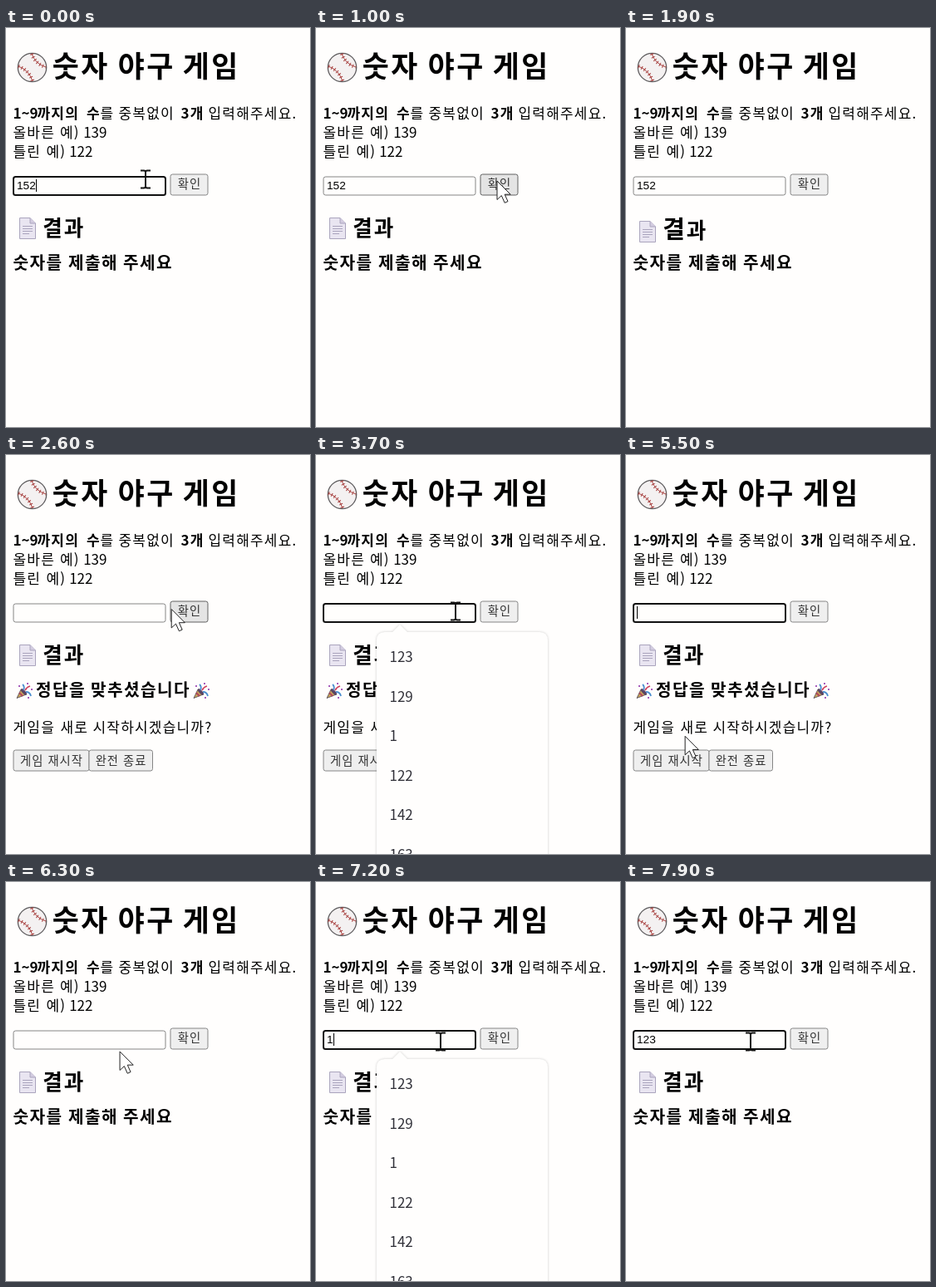
Recreate the animation shown at these times as an HTML page. Size 366 by 480 pixels, loop 8 s.

```html
<!DOCTYPE html>
<html lang="ko">
<head>
<meta charset="utf-8">
<style>
  html, body { margin: 0; width: 100%; height: 100%; overflow: hidden; background: #fffefd; }
  svg { display: block; width: 366px; height: 480px; font: 17px "Noto Sans CJK KR", "Noto Sans CJK", sans-serif; letter-spacing: .07em; }
  text { letter-spacing: .07em; }
  .bold, .h1, .h2, .h3 { font-weight: 700; }
  .h1 { font-size: 34.8px; }
  .h2 { font-size: 25.6px; }
  .h3 { font-size: 20.2px; }
  .num { letter-spacing: 0; }
  .button rect { fill: #efefef; stroke: #858585; }
  .button.hover rect { fill: #e4e4e4; stroke: #606060; }
  .button text { font-size: 14.3px; fill: #333; text-anchor: middle; }
  #field { fill: #fffefd; stroke: #858585; }
  #field.focus { stroke: #111; stroke-width: 2; }
  #value { font: 13.7px "Liberation Sans", Arial, sans-serif; letter-spacing: 0; }
  #list text { fill: #303038; letter-spacing: 0; }
  #panel { fill: #fffefd; filter: drop-shadow(0 0 1.5px #0003); }
</style>
</head>
<body>
<svg viewBox="0 0 366 480">
  <defs>
    <g id="popper">
      <path d="M1 18.5 6 8Q11 9 12.5 14Z" fill="#c9a45c" stroke="#4a4350" stroke-width=".8"/>
      <path d="M4 12 8 16" stroke="#b0475c" stroke-width="2"/>
      <ellipse cx="9.5" cy="11" rx="2" ry="4.8" transform="rotate(-42 9.5 11)" fill="#5b4563"/>
      <path d="M9 9Q11 5 8 2M12 11Q17 11 18 16" fill="none" stroke="#4c8fd0" stroke-width="1.8"/>
      <path d="M11 9Q13 5 17 4" fill="none" stroke="#cf4562" stroke-width="1.8"/>
      <path d="M3 4h2M13 1h2M18 8h2M14 18h2" stroke="#a85dbb" stroke-width="2"/>
    </g>
  </defs>

  <g fill="none" stroke="#a8413f">
    <circle cx="31.5" cy="47.5" r="17.2" fill="#f4f1f1" stroke="#5e5c5e" stroke-width="1.3"/>
    <path d="M31 31Q35 43 48 47M15 46Q28 51 32 64"/>
    <path d="M31 31Q35 43 48 47M15 46Q28 51 32 64" stroke-width="4.5" stroke-dasharray="1 3"/>
  </g>
  <text class="h1" y="58.7"><tspan x="55.8">숫자</tspan><tspan x="134.8">야구</tspan><tspan x="212.8">게임</tspan></text>

  <text y="109.2"><tspan class="bold num" x="8.5">1~9</tspan><tspan class="bold" x="37.5">까지의</tspan><tspan class="bold" x="97">수</tspan><tspan x="113.5">를</tspan><tspan x="135.5">중복없이</tspan><tspan class="bold" x="210.5">3개</tspan><tspan x="243.5">입력해주세요.</tspan></text>
  <text y="132"><tspan x="8.5">올바른</tspan><tspan x="65">예)</tspan><tspan class="num" x="93.2">139</tspan></text>
  <text y="154.5"><tspan x="8.5">틀린</tspan><tspan x="48.5">예)</tspan><tspan class="num" x="76.2">122</tspan></text>

  <rect id="field" x="9" y="179" width="183" height="22" rx="2.5"/>
  <text id="value" x="13" y="193.5"></text>
  <path id="caret" stroke="#000"/>
  <g class="button" id="submit">
    <rect x="198" y="176" width="45" height="25" rx="2.5"/><text x="221" y="193">확인</text>
  </g>

  <g id="page" stroke="#aaa4bd">
    <path d="M16.5 228.5H29L35.5 235V253.5H16.5Z" fill="#e9e5f1"/>
    <path d="M29 228.5V235H35.5" fill="#d3cce0"/>
    <path d="M20 238.5H32M20 241.5H32M20 244.5H32M20 247.5H28"/>
  </g>
  <text class="h2" id="result" x="44.3"></text>

  <text class="h3" id="prompt" y="289.5"><tspan x="8.5">숫자를</tspan><tspan x="75">제출해</tspan><tspan x="141">주세요</tspan></text>
  <g id="win">
    <use href="#popper" x="12" y="274"/>
    <text class="h3" y="289.5"><tspan x="36">정답을</tspan><tspan x="102">맞추셨습니다</tspan></text>
    <use href="#popper" x="225" y="274"/>
    <text y="333.5"><tspan x="8.5">게임을</tspan><tspan x="65.5">새로</tspan><tspan x="104.5">시작하시겠습니까?</tspan></text>
    <g class="button" id="restart">
      <rect x="9" y="355" width="91" height="25" rx="2.5"/><text x="55" y="372.5">게임 재시작</text>
    </g>
    <g class="button">
      <rect x="100" y="355" width="76.5" height="25" rx="2.5"/><text x="138.5" y="372.5">완전 종료</text>
    </g>
  </g>

  <g id="list"><path id="panel"/><g id="options"></g></g>

  <path id="arrow" d="M0 0V22.5L5.3 17.6 9.2 26.3 13 24.6 9.2 16.2H16.2Z" fill="#fff" stroke="#222"/>
  <path id="beam" d="M-6 -10.5H-2Q0 -10.5 0 -8.5Q0 -10.5 2 -10.5H6M-6 10.5H-2Q0 10.5 0 8.5Q0 10.5 2 10.5H6M0 -9V9" fill="none" stroke="#111" stroke-width="2"/>
</svg>
<script>
const LOOP = 8000;
const $ = id => document.getElementById(id);
const show = (id, on) => $(id).style.display = on ? '' : 'none';
const between = (t, from, to) => t >= from && t < to;

// [time, x, y] of the mouse
const route = [
  [0, 168, 182], [300, 168, 182], [800, 218, 184], [2300, 218, 184], [3100, 168, 188],
  [5000, 168, 188], [5600, 52, 368], [5800, 52, 368], [6000, 72, 336], [6300, 137, 204],
  [6550, 150, 192], [LOOP, 150, 192]
];
// [time, field text]
const entries = [[0, '152'], [2000, ''], [7100, '1'], [7250, '12'], [7400, '123']];
const history = ['123', '129', '1', '122', '142', '163'];

function mouseAt(t) {
  const i = route.findIndex(p => p[0] > t);
  const [t0, x0, y0] = route[i - 1], [t1, x1, y1] = route[i];
  const k = (t - t0) / (t1 - t0);
  return [x0 + (x1 - x0) * k, y0 + (y1 - y0) * k];
}

function drawList(typed) {
  const items = history.filter(s => s.startsWith(typed));
  const bottom = 219 + items.length * 47.5;
  $('panel').setAttribute('d', `M83 213H92L101 204 110 213H269Q279 213 279 223V${bottom - 10}Q279 ${bottom} 269 ${bottom}H83Q73 ${bottom} 73 ${bottom - 10}V223Q73 213 83 213Z`);
  $('options').innerHTML = items.map((s, i) => `<text x="88.5" y="${249 + i * 47.5}">${s}</text>`).join('');
}

let listed = null;
function draw(t) {
  const [x, y] = mouseAt(t);
  const [typedAt, typed] = entries.findLast(e => e[0] <= t);
  const focusedAt = t < 900 ? 0 : between(t, 3100, 5650) ? 3100 : t >= 6600 ? 6600 : -1;
  const focused = focusedAt >= 0;
  const won = between(t, 2000, 5700);
  const shifting = between(t, 1900, 2000);

  $('value').textContent = typed;
  $('field').classList.toggle('focus', focused);
  const caretX = 13.5 + Math.round(typed.length * 7.62);
  $('caret').setAttribute('d', `M${caretX} 182V197`);
  show('caret', focused && (t - Math.max(focusedAt, typedAt)) % 1000 < 500);

  show('prompt', !won);
  show('win', won);
  $('page').setAttribute('transform', `translate(0 ${shifting ? 4 : 0})`);
  $('result').innerHTML = `<tspan font-size="${shifting ? 29 : 25.6}">결</tspan>과`;
  $('result').setAttribute('y', shifting ? 253 : 249.5);

  const open = between(t, 3300, 4050) || between(t, 6900, 7400);
  show('list', open);
  if (open && listed !== typed) drawList(listed = typed);

  const overField = between(x, 9, 192) && between(y, 178, 202);
  for (const id of ['arrow', 'beam']) {
    $(id).setAttribute('transform', `translate(${x} ${y})`);
    show(id, !between(t, 1900, 2100) && overField === (id === 'beam'));
  }
  $('submit').classList.toggle('hover', !shifting && x >= 198 && between(y, 176, 201));
  $('restart').classList.toggle('hover', x < 100 && between(y, 355, 381));
}

function tick() {
  draw(performance.now() % LOOP);
  requestAnimationFrame(tick);
}
tick();
</script>
</body>
</html>
```
